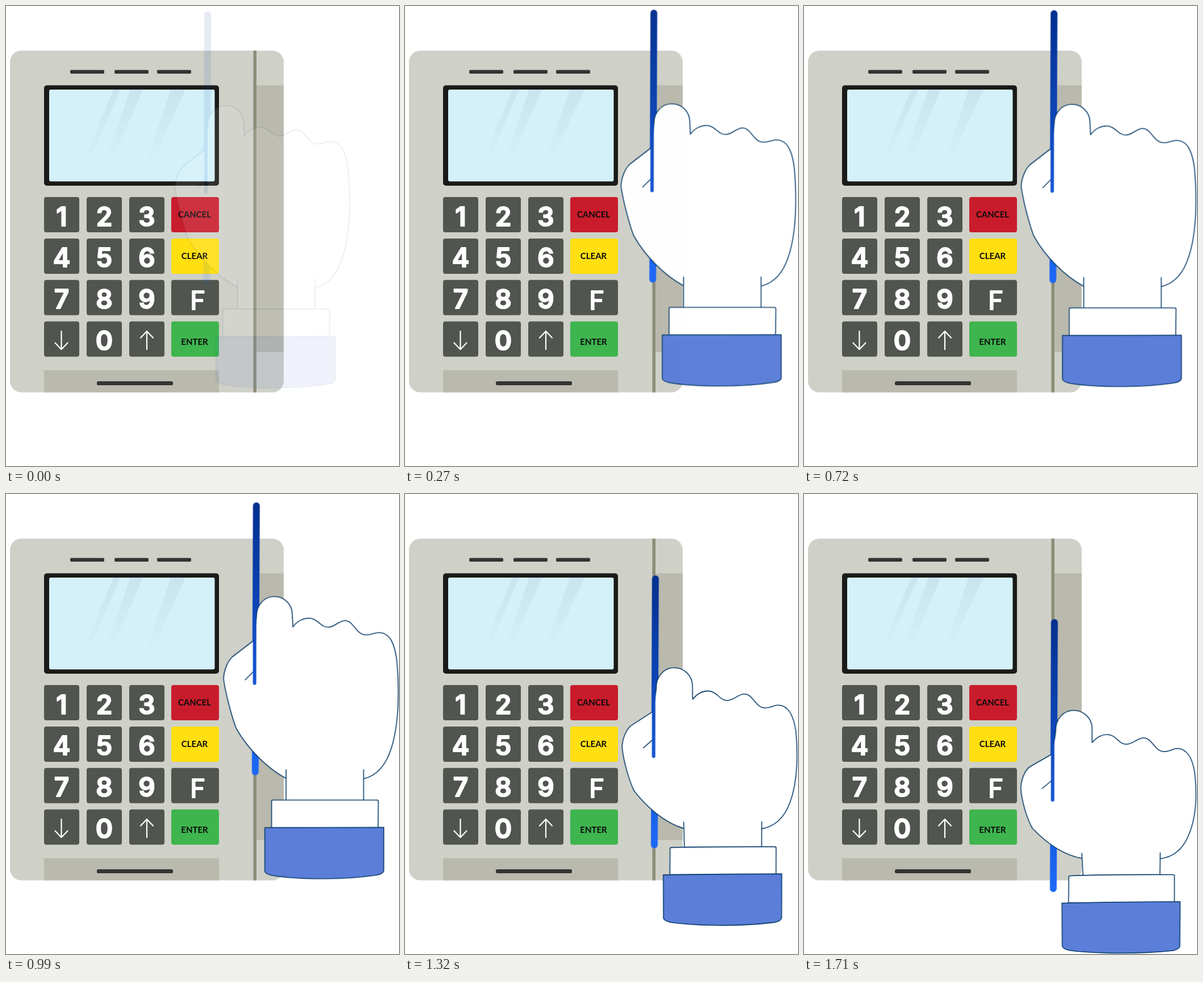
An HTML page that plays this animation: 692x809 px, repeating every 2.61 s.

```html
<!DOCTYPE html>
<html lang="en">
<head>
<meta charset="utf-8">
<title>Card swipe</title>
<style>
  html, body { margin: 0; width: 100%; height: 100%; overflow: hidden; background: #fff; }
  svg { display: block; width: 692px; height: 809px; }

  .body { fill: #cfd0c8; }
  .shade { fill: #bab9ad; }
  .dark { fill: #343434; }
  .key { fill: #50554f; }
  .digit { font: 600 46px Inter, sans-serif; fill: #fff; stroke: #fff; stroke-width: 2; stroke-linejoin: round; text-anchor: middle; }
  .letter { font-family: Lato, sans-serif; font-weight: 400; }
  .label { font: 700 15px Lato, sans-serif; fill: #0c0c0c; text-anchor: middle; }
  .arrow { fill: none; stroke: #fff; stroke-width: 2.2; stroke-linecap: round; stroke-linejoin: round; }

  .skin { fill: #fff; stroke: #0a3d6b; stroke-width: 1.6; stroke-linecap: round; stroke-linejoin: round; }
  .sleeve { fill: #5b7ed8; }
  .card { fill: none; stroke: url(#blue); stroke-linecap: round; }

  .anim { animation: 2610ms infinite paused; animation-timing-function: cubic-bezier(.36, 0, .17, 1); }
  .swipe { animation-name: approach; }
  .fade { animation-name: fade; }
  .card { animation-name: slide; }
  .hand { animation-name: hand; }
  .wrist { animation-name: wrist; }
  .crease { animation-name: crease; }
  .cuff { animation-name: cuff; }
  .sleeve { animation-name: sleeve; }

  @keyframes approach {
    0% { transform: translate(-85.5px, 2.5px); animation-timing-function: cubic-bezier(.36, 0, .4, 1); }
    10.345% { transform: translate(-2.5px, -.5px); }
    19.54% { transform: translate(-1.4px, -11px); }
    41.379%, 100% { transform: translate(.2px, 8px); }
  }
  @keyframes fade {
    0% { opacity: .1; }
    12.644%, 100% { opacity: 1; }
  }
  /* the downward swipe runs from 1080 to 1710 ms */
  @keyframes slide {
    0%, 41.379% { transform: translateY(0); }
    65.517%, 100% { transform: translateY(205px); }
  }
  @keyframes hand {
    0%, 41.379% { d: path("M493 492.5 C460 475 425 440 405 404 C396 380 386 340 383 318 C383 303 390 287 398 279 L437 249 L441 207 C441 187 455 172.5 472 172.5 C490 172.5 504 186 504 205 L505 226 C513 215 524 210.5 533 210.5 C549 211 553 226.500 567 226.500 C579 226.500 585 215 597 215 C612 215 616 240 634 240 C645 240 648 236 656 236 C676 236 684 255 688 285 C692 330 693 395 678 440 C668 472 650 488 630 493"); }
    65.517%, 100% { d: path("M490 633 C455 627 425 604 402 580 C392 562 383 532 381.5 509 C382 495 388 479 397 472 L437 449 L443 410 C442 388 457 372.5 474 372.5 C493 372.5 507 387 507 404 L507 429 C515 420 524 415 533 415 C550 415 553 432 567 432 C580 432 586 421 598 421 C613 421 617 445 634 445 C645 445 649 439.5 657 439.5 C674 440 684 456 688 484 C692 522 690 562 677 592 C665 622 645 631 627 633.5"); }
  }
  @keyframes wrist {
    0%, 41.379% { d: path("M493 477 L493 531 L629.5 531 L629.5 477"); }
    65.517%, 100% { d: path("M489 624 L491 663 L626.5 662 L627 623"); }
  }
  @keyframes crease {
    0%, 41.379% { d: path("M421 319 L437 303"); }
    65.517%, 100% { d: path("M419 510 L437 495"); }
  }
  @keyframes cuff {
    0%, 41.379% { d: path("M470 530.5 L653 530.5 Q655.500 530.500 655.500 533 L655 579 L467.500 579 L467.500 533 Q467.500 530.500 470 530.500 Z"); }
    65.517%, 100% { d: path("M468.500 664 Q560 662 560 662 L649.500 661.500 Q652 661.500 652 664 L652 709.500 L465.500 711 L466 666 Z"); }
  }
  @keyframes sleeve {
    0%, 41.379% { d: path("M455.5 579 L665 578.5 L665 655 Q664 660 652 662.5 Q608 669 560 669 Q505 669 468 663 Q456 660 455.5 656 Z"); }
    65.517%, 100% { d: path("M454 711.5 Q560 709 662 709 L661.500 787 Q661 792 650 795 Q606 799.500 558 799.500 Q505 799.500 466 794.500 Q455 791.500 454.500 787 Z"); }
  }
  /* matching segment types so that both shapes blend */
  @keyframes cuff {
    0%, 41.379% { d: path("M470 530.5 Q560 530.5 653 530.5 Q655.5 530.5 655.5 533 L655 579 L467.5 579 L467.5 533 Q467.5 530.5 470 530.5 Z"); }
    65.517%, 100% { d: path("M468.5 663.5 Q530 661 649.5 661.5 Q652 661.5 652 664 L652 709.5 L465.5 711 L466 666 Q466 663.5 468.5 663.5 Z"); }
  }
  @keyframes sleeve {
    0%, 41.379% { d: path("M455.5 579 Q560 578.5 665 578.5 L665 655 Q664 660 652 662.5 Q608 669 560 669 Q505 669 468 663 Q456 660 455.5 656 Z"); }
    65.517%, 100% { d: path("M454 711.5 Q560 709 662 709 L661.5 787 Q661 792 650 795 Q606 799.5 558 799.5 Q505 799.5 466 794.5 Q455 791.5 454.5 787 Z"); }
  }
</style>
</head>
<body>
<svg viewBox="0 0 692 809">
  <defs>
    <linearGradient id="blue" gradientUnits="userSpaceOnUse" x1="0" y1="7" x2="0" y2="487">
      <stop offset="0" stop-color="#04308f"/>
      <stop offset="1" stop-color="#1d69f8"/>
    </linearGradient>
    <linearGradient id="glare" gradientUnits="userSpaceOnUse" x1="0" y1="147" x2="0" y2="280">
      <stop offset="0" stop-color="#c8e5ee"/>
      <stop offset="1" stop-color="#c8e5ee" stop-opacity="0"/>
    </linearGradient>
  </defs>

  <rect class="body" x="7" y="78.5" width="482" height="601" rx="20"/>
  <rect class="shade" x="441" y="139.5" width="48" height="469"/>
  <rect x="435.5" y="78.5" width="5.5" height="601" fill="#8e8e78"/>
  <rect class="dark" x="113" y="112.500" width="60" height="6.500" rx="2"/>
  <rect class="dark" x="191" y="112.500" width="60" height="6.500" rx="2"/>
  <rect class="dark" x="266" y="112.500" width="60" height="6.500" rx="2"/>
  <rect x="67" y="139.500" width="308" height="176.500" rx="5" fill="#1a1a18"/>
  <rect x="76" y="147" width="291.500" height="161.500" rx="3" fill="#d4f1fa"/>
  <path fill="url(#glare)" d="M189 147H201L148 270H138ZM219 147H241L190 265H178ZM290 147H316L254 280H245Z"/>
  <rect class="shade" x="67" y="640.500" width="308" height="39"/>
  <rect class="dark" x="160" y="660" width="134" height="7" rx="2.500"/>
  <g id="keys"></g>
  <path class="arrow" d="M97.500 572V604M86.500 592.500L97.500 604L108.500 592.500"/>
  <path class="arrow" d="M248 604V572M237 583.500L248 572L259 583.500"/>

  <g class="anim swipe">
    <g class="anim fade">
      <path class="anim card" stroke-width="12" d="M440.700 13L438.700 481"/>
      <path class="anim skin hand"/>
      <path class="anim skin wrist"/>
      <path class="anim skin crease"/>
      <path class="anim card" stroke-width="6" d="M437.700 190L437.500 325"/>
      <path class="anim skin cuff"/>
      <path class="anim skin sleeve"/>
    </g>
  </g>
</svg>
<script>
  const keys = document.getElementById('keys');

  function add(name, attrs, text = '') {
    const el = document.createElementNS('http://www.w3.org/2000/svg', name);
    for (const k in attrs) el.setAttribute(k, attrs[k]);
    el.textContent = text;
    keys.append(el);
    return el;
  }

  const cols = [67, 142, 217, 291];
  const rows = ['123', '456', '789', ' 0 '];
  const actions = [['CANCEL', '#c81c2c'], ['CLEAR', '#ffdf10'], ['F', '#50554f'], ['ENTER', '#3eb54e']];

  rows.forEach((row, r) => {
    const y = 336 + r * 72.9;
    cols.forEach((x, c) => {
      const key = add('rect', { class: 'key', x, y, width: c < 3 ? 62 : 84, height: 62, rx: 4 });
      if (c === 3) {
        const [name, color] = actions[r];
        key.style.fill = color;
        if (name === 'F') add('text', { class: 'digit letter', x: 337, y: 534 }, name);
        else add('text', { class: 'label', x: 332, y: y + (r === 3 ? 41 : 36) }, name);
      } else if (row[c] !== ' ') {
        add('text', { class: 'digit', x: x + 31, y: y + 50.5 }, row[c]);
      }
    });
  });

  // All motion is sampled on a 30 ms grid.
  const LOOP = 2610, STEP = 30;
  const anims = document.getAnimations();
  const start = performance.now();

  function tick(now) {
    const t = Math.max(0, now - start) % LOOP;
    const at = Math.floor((t + 0.5) / STEP) * STEP % LOOP;
    for (const a of anims) a.currentTime = at;
    requestAnimationFrame(tick);
  }
  tick(start);
</script>
</body>
</html>
```
